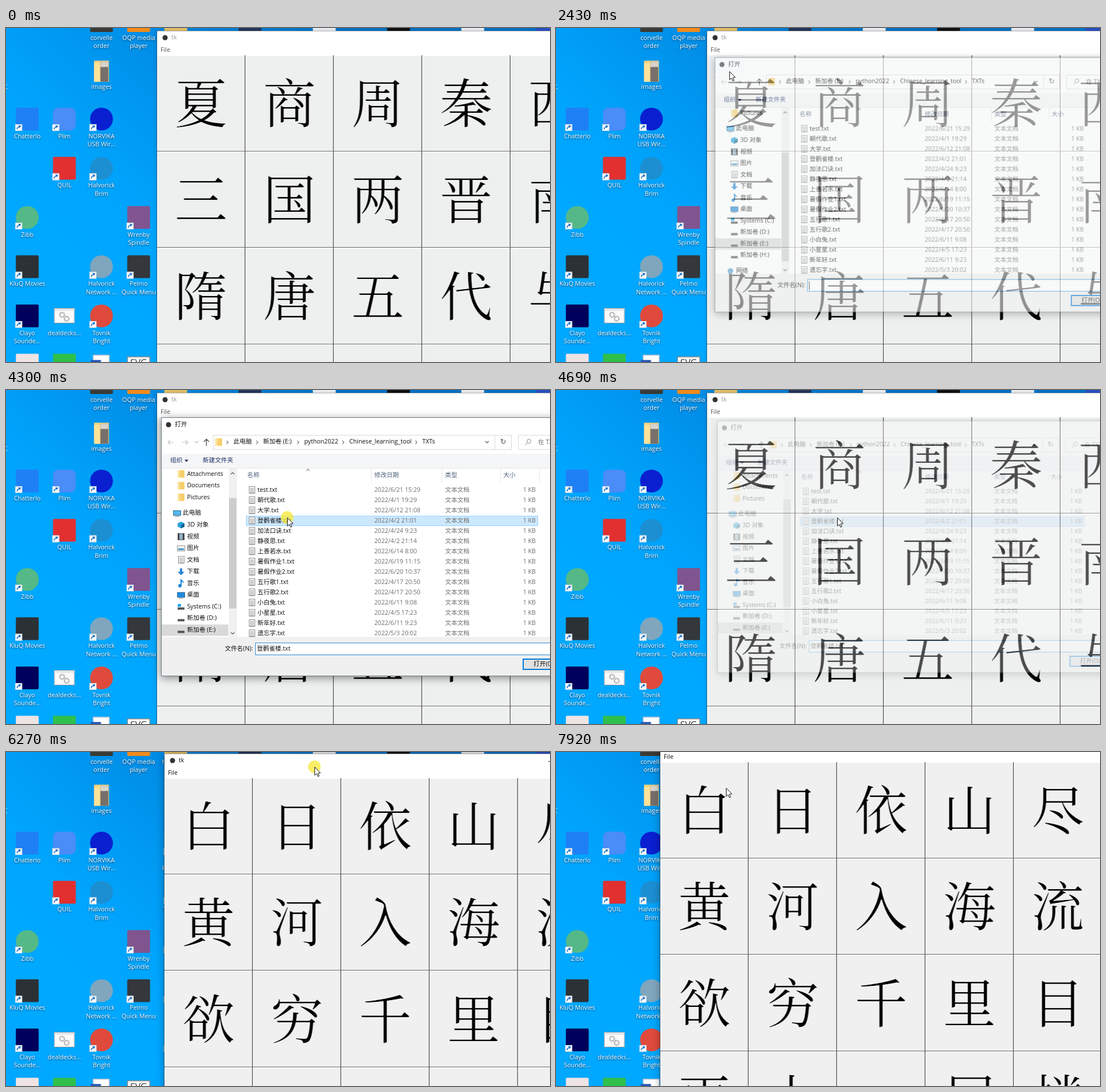
Recreate the animation shown at these times as an HTML page with a canvas. Size 954 px wide and 587 px high, loop 8000 ms.

```html
<!DOCTYPE html>
<html lang="zh">
<meta charset="utf-8">
<style>
html, body { margin: 0; width: 100%; height: 100%; overflow: hidden; background: #0092ec; }
canvas { display: block; }
</style>
<canvas id="stage" width="954" height="587"></canvas>
<script>
const LOOP = 8000;
const UI = '"Open Sans","Noto Sans CJK SC",sans-serif';
const ctx = document.getElementById('stage').getContext('2d');

function layer(w, h) {
  const c = document.createElement('canvas');
  c.width = w; c.height = h;
  return c.getContext('2d', { willReadFrequently: true });
}
function rect(g, x, y, w, h, fill, stroke, width = 1) {
  if (fill) { g.fillStyle = fill; g.fillRect(x, y, w, h); }
  if (stroke) {
    g.strokeStyle = stroke; g.lineWidth = width;
    g.strokeRect(x + .5, y + .5, w - 1, h - 1);
  }
}
function disc(g, x, y, r, fill) {
  g.fillStyle = fill;
  g.beginPath(); g.arc(x, y, r, 0, 7); g.fill();
}
function text(g, s, x, y, fill = '#111', align = 'left', size = 10.7) {
  g.font = size + 'px ' + UI;
  g.textAlign = align; g.textBaseline = 'middle'; g.fillStyle = fill;
  g.fillText(s, x, y);
}
function path(g, points, stroke, width = 1, close, fill) {
  g.beginPath();
  for (let i = 0; i < points.length; i += 2) g.lineTo(points[i], points[i + 1]);
  if (close) g.closePath();
  if (fill) { g.fillStyle = fill; g.fill(); }
  if (stroke) { g.strokeStyle = stroke; g.lineWidth = width; g.stroke(); }
}
function chevron(g, x, y, dir, color = '#555') {
  const d = { up: [-3, 2, 0, -1, 3, 2], down: [-3, -2, 0, 1, 3, -2], right: [-1, -3, 1.5, 0, -1, 3] }[dir];
  path(g, d.map((v, i) => v + (i % 2 ? y : x)), color, 1.1);
}

// Desktop: column, row, label, shape, colour
const ICONS = [
  [2, 0, 'corvelle|order', 'sq', '#3a3a35'], [3, 0, 'OQP media|player', 'sq', '#f08a1c'],
  [4, 0, 'Hux Clam', 'sq', '#e8c66a'], [6, 0, 'Dunmere|Creati...', 'sq', '#24365a'],
  [8, 0, '月亮没来过.|docx', 'sq', '#f2f4f8'], [10, 0, '云拼片', 'sq', '#111'],
  [12, 0, '千叶存盘', 'sq', '#f2f4f8'], [14, 0, 'Q 移机..', 'sq', '#2a52c8'],
  [2, 1, 'images', 'folder', ''], [0, 2, 'Chatterlo', 'sq', '#1f80f6'],
  [1, 2, 'Plim', 'sq', '#4a8cf8'], [2, 2, 'NORVIKA|USB Wir...', 'disc', '#0a1fd0'],
  [1, 3, 'QUIL', 'sq', '#e23030'], [2, 3, 'Halvorick|Brim', 'disc', '#1c8fd2'],
  [0, 4, 'Zibb', 'disc', '#55b987'], [3, 4, 'Wrenby|Spindle', 'sq', '#80558f'],
  [0, 5, 'KluQ Movies', 'sq', '#2c3136'], [2, 5, 'Halvorick|Network ...', 'disc', '#7fa6bd'],
  [3, 5, 'Pelmo|Quick Menu', 'sq', '#34373b'], [0, 6, 'Clayo|Sounde...', 'sq', '#00005c'],
  [1, 6, 'dealdecks...', 'gears', ''], [2, 6, 'Tovnik|Bright', 'disc', '#e04a3c'],
  [4, 2, 'Clayo|Paperon..', 'sq', '#e6dcdc'], [4, 3, 'TinHarps', 'sq', '#e3a32c'],
  [4, 4, 'Orbalo', 'disc', '#2b8f86'], [4, 5, 'Dunel|Utiliti', 'sq', '#1553b5'],
  [4, 6, '回收站', 'sq', '#cfd8de'], [0, 7, '', 'sq', '#eee4e4'], [1, 7, '', 'sq', '#2fc04c'],
  [2, 7, '', 'doc', ''], [3, 7, '', 'svg', ''], [4, 7, '', 'sq', '#a02030']
];

function drawIcon(g, [col, row, label, kind, color]) {
  const x = 37.3 + col * 65.1, y = -13 + row * 86.5;
  if (kind == 'sq') {
    g.fillStyle = color;
    g.beginPath(); g.roundRect(x - 20, y - 20, 40, 40, col == 1 && row == 2 ? 9 : 2); g.fill();
  } else if (kind == 'disc') disc(g, x, y, 20, color);
  else if (kind == 'folder') {
    rect(g, x - 13, y - 16, 26, 37, '#f7d57a');
    rect(g, x - 2, y - 14, 14, 35, '#77706a');
    rect(g, x - 2, y - 14, 14, 9, '#d8d4cc');
    rect(g, x - 13, y - 12, 10, 33, '#fbe29a');
  } else if (kind == 'gears') {
    rect(g, x - 18, y - 14, 36, 27, '#fafafa', '#8a9aa6');
    rect(g, x - 17, y - 13, 34, 4, '#dfe6ea');
    for (const [dx, dy, r] of [[-4, -2, 4], [4, 5, 4]]) {
      g.strokeStyle = '#a0a0a0'; g.lineWidth = 2.4; g.setLineDash([2, 1]);
      g.beginPath(); g.arc(x + dx, y + dy, r, 0, 7); g.stroke();
      g.setLineDash([]);
    }
  } else if (kind == 'doc') {
    rect(g, x - 15, y - 18, 29, 40, '#fff', '#9ab');
    rect(g, x - 19, y - 9, 18, 20, '#2457b8');
  } else {
    rect(g, x - 20, y - 15, 40, 40, '#fff', '#555');
    text(g, 'SVG', x, y - 3, '#333', 'center', 16);
  }
  if (row && kind != 'folder' && kind != 'gears') {
    rect(g, x - 21, y + 9, 12, 12, '#fff', '#c8d4dd');
    path(g, [x - 18, y + 18, x - 17, y + 15, x - 13, y + 13], '#1a6fc4', 1.6);
    path(g, [x - 16, y + 11, x - 11, y + 11.5, x - 13, y + 16], null, 1, true, '#1a6fc4');
  }
  g.shadowColor = '#002a50'; g.shadowBlur = 3; g.shadowOffsetY = 1;
  label.split('|').forEach((s, i) => text(g, s, x, 18 + row * 86.5 + i * 14.5, '#fff', 'center', 10.8));
  g.shadowColor = 'transparent'; g.shadowOffsetY = 0;
}

function makeDesktop() {
  const g = layer(954, 587);
  const sky = g.createLinearGradient(150, 450, 600, 0);
  ['#00a8ff', '#00a5fd', '#009af3', '#008de6', '#0080d9', '#0074cc']
    .forEach((color, i) => sky.addColorStop(i / 5, color));
  rect(g, 0, 0, 954, 587, sky);
  ICONS.forEach(i => drawIcon(g, i));
  text(g, '工', 3, 104, '#fff', 'right');
  text(g, '(', 1, 191, '#fff', 'right');
  return g.canvas;
}

// Large characters, thinned towards a light Song face
function rawGlyph(ch) {
  const g = layer(120, 120);
  g.font = '300 93px "Noto Serif CJK SC","Noto Sans CJK SC",serif';
  g.textAlign = 'center'; g.textBaseline = 'middle';
  g.fillText(ch, 60, 60);
  return g;
}
function strokeWidth(g, x, y, w, h) {
  return g.getImageData(x, y, w, h).data.reduce((sum, v, i) => i % 4 == 3 ? sum + v / 255 : sum, 0);
}
const probe = rawGlyph('十');
const thinX = Math.max(0, (strokeWidth(probe, 0, 88, 120, 1) - 5) * .5);
const thinY = Math.max(0, (strokeWidth(probe, 35, 0, 1, 120) - 2.6) * .45);

function glyph(ch) {
  const raw = rawGlyph(ch).canvas, g = layer(120, 120);
  g.drawImage(raw, -thinX / 2, -thinY / 2);
  g.globalCompositeOperation = 'destination-in';
  g.drawImage(raw, thinX / 2, thinY / 2);
  return g.canvas;
}

const CELL_W = 155, CELL_H = 169.4;
function makeGrid(rows, color) {
  const g = layer(800, 720);
  rect(g, 0, 0, 800, 720, color);
  rows.forEach((row, r) => [...row].forEach((ch, c) => {
    const x = c * CELL_W, y = Math.round(r * CELL_H);
    rect(g, x, y, CELL_W, 1, '#fff');
    rect(g, x, y, 1, 170, '#fff');
    rect(g, x + 153, y, 1, 170, '#a6a6a6');
    rect(g, x + 154, y, 1, 170, '#686868');
    rect(g, x, y + 168, CELL_W, 1, '#686868');
    g.drawImage(glyph(ch), x + 17, y + 24);
  }));
  return g.canvas;
}

const desktop = makeDesktop();
const dynasties = makeGrid(['夏商周秦西', '三国两晋南', '隋唐五代与', '     '], '#eef0f0');
const poem = makeGrid(['白日依山尽', '黄河入海流', '欲穷千里目', '更上一层楼'], '#f0f0f0');

function drawWindow(x, y, grid, active) {
  ctx.save();
  ctx.shadowColor = active ? 'rgba(0,0,0,.4)' : 'rgba(0,0,0,.22)';
  ctx.shadowBlur = active ? 13 : 7;
  rect(ctx, x, y, 800, 760, '#fff');
  ctx.restore();
  disc(ctx, x + 14, y + 12, 4.5, '#333');
  text(ctx, 'tk', x + 25, y + 12, active ? '#111' : '#999');
  if (grid == poem) path(ctx, [x + 673, y + 13.5, x + 682, y + 13.5], '#333');
  text(ctx, 'File', x + 6, y + 34, active ? '#111' : '#555');
  ctx.drawImage(grid, x, y + 43);
  rect(ctx, x - 1, y, 1, 760, 'rgba(60,60,60,.5)');
  rect(ctx, x, y, 800, 1, 'rgba(60,60,60,.35)');
}

const FILES = `test|6/21 15:29
朝代歌|4/1 19:29
大学|6/12 21:08
登鹳雀楼|4/2 21:01
加法口诀|4/24 9:23
静夜思|4/2 21:14
上善若水|6/14 8:00
暑假作业1|6/19 11:15
暑假作业2|6/20 10:37
五行歌1|4/17 20:50
五行歌2|4/17 20:50
小白兔|6/11 9:08
小星星|4/5 17:23
新年好|6/11 9:23
遗忘字|5/3 20:02`.split('\n').map(s => s.split('|'));
const TREE = ['Attachments', 'Documents', 'Pictures', '此电脑', '3D 对象', '视频', '图片', '文档', '下载',
  '音乐', '桌面', 'Systems (C:)', '新加卷 (D:)', '新加卷 (E:)', '新加卷 (H:)', '网络'];
const CRUMBS = [[399, '此电脑'], [451, '新加卷 (E:)'], [523, 'python2022'], [602, 'Chinese_learning_tool'], [730, 'TXTs']];

function sheet(g, x, y) {
  rect(g, x - 5, y - 7, 11, 13, '#fff', '#8b8b8b');
  for (let i = -4; i < 5; i += 2) rect(g, x - 3, y + i, 7, 1, '#a5a5a5');
}

function treeIcon(g, i, x, y) {
  if (i < 3) {
    rect(g, x - 6, y - 7, 12, 13, '#f6cf6b');
    rect(g, x - 6, y - 7, 4, 13, '#fbe09a');
  } else if (i == 3 || i == 10) {
    rect(g, x - 7, y - 5, 14, 9, i == 3 ? '#55b9ee' : '#1d8be0', '#3a6f9a');
    rect(g, x - 4, y + 5, 8, 1, '#777');
  } else if (i == 4) {
    path(g, [x, y - 6, x + 6, y - 3, x + 6, y + 3, x, y + 6, x - 6, y + 3, x - 6, y - 3], null, 1, true, '#27a3d8');
    path(g, [x, y, x + 6, y - 3, x + 6, y + 3, x, y + 6], null, 1, true, '#13658f');
  } else if (i == 5) {
    rect(g, x - 6, y - 6, 12, 12, '#444');
    rect(g, x - 3, y - 5, 6, 10, '#8fb0c6');
  } else if (i == 6) {
    rect(g, x - 7, y - 5, 14, 10, '#fff', '#888');
    rect(g, x - 5, y, 10, 3, '#3c8fc8');
  } else if (i == 7) sheet(g, x, y);
  else if (i == 8) {
    path(g, [x - 2, y - 6, x + 2, y - 6, x + 2, y, x + 6, y, x, y + 6, x - 6, y, x - 2, y], null, 1, true, '#2484d6');
  } else if (i == 9) {
    disc(g, x - 2, y + 4, 3, '#1f86d8');
    path(g, [x, y + 4, x, y - 6, x + 4, y - 2], '#1f86d8', 2);
  } else if (i == 15) disc(g, x, y, 5, '#5a9fd0');
  else {
    rect(g, x - 6, y + 1, 12, 4, '#555');
    if (i == 11) rect(g, x - 6, y - 5, 6, 5, '#28a8ea');
  }
}

function drawTree(g, scroll) {
  g.save();
  g.beginPath(); g.rect(273, 138, 132, 296); g.clip();
  rect(g, 273, 138, 132, 296, '#fff');
  TREE.forEach((name, i) => {
    const y = 148 + i * 20.55 + (i > 2 ? 7 : 0) + (i > 14 ? 7 : 0) - scroll;
    const root = i == 3 || i == 15;
    if (i == 13) rect(g, 273, y - 10, 117, 20, '#d9d9d9');
    treeIcon(g, i, root ? 300 : 307, y);
    text(g, name, root ? 310 : 317.5, y);
  });
  rect(g, 391, 138, 14, 296, '#f0f0f0');
  rect(g, 391, 190 + scroll * .68, 13, 194, '#cdcdcd');
  chevron(g, 397.5, 146, 'up');
  chevron(g, 397.5, 428, 'down');
  g.restore();
}

function drawFiles(g, hover, picked) {
  rect(g, 405, 138, 702, 296, '#fff');
  [[423, '名称'], [646, '修改日期'], [770, '类型'], [872, '大小']].forEach(([x, s]) => text(g, s, x, 150, '#4c607a'));
  for (const x of [640, 764, 867, 935]) rect(g, x, 138, 1, 25, '#e5e5e5');
  chevron(g, 529.5, 140, 'up', '#888');
  FILES.forEach(([name, date], i) => {
    const y = 176 + i * 18;
    if (i == picked) rect(g, 421, y - 9, 512, 18, '#cce8ff', '#99d1ff');
    else if (i == hover) rect(g, 421, y - 9, 512, 18, '#e5f3ff');
    sheet(g, 431, y);
    text(g, name + '.txt', 441, y);
    text(g, '2022/' + date, 646, y, '#6d6d6d');
    text(g, '文本文档', 770, y, '#6d6d6d');
    text(g, '1 KB', 929, y, '#6d6d6d', 'right');
  });
}

function drawDialog(g, t, mouse) {
  g.save();
  g.shadowColor = 'rgba(0,0,0,.45)'; g.shadowBlur = 14; g.shadowOffsetY = 3;
  rect(g, 272, 48, 836, 455, '#f0f0f0');
  g.restore();
  rect(g, 272, 48, 836, 64, '#fff');
  disc(g, 285, 61, 4.5, '#333');
  text(g, '打开', 296, 61);
  for (const [x, d] of [[289, -1], [314, 1]]) {
    path(g, [x - 5, 92, x + 5, 92], '#c4c4c4', 1.2);
    path(g, [x + d, 88, x + d * 5, 92, x + d, 96], '#c4c4c4', 1.2);
  }
  chevron(g, 334, 92, 'down', '#bbb');
  path(g, [351.5, 98, 351.5, 87], '#444', 1.3);
  path(g, [347, 91, 351.5, 86.5, 356, 91], '#444', 1.3);
  rect(g, 363, 79, 524, 26, '#fff', '#d9d9d9');
  rect(g, 857, 79, 1, 26, '#d9d9d9');
  treeIcon(g, 0, 373, 92);
  CRUMBS.forEach(([x, s]) => {
    chevron(g, x - 11, 92, 'right');
    text(g, s, x, 91.5);
  });
  chevron(g, 843.5, 92, 'down');
  text(g, '↻', 872, 92, '#555', 'center', 13);
  rect(g, 898, 79, 200, 26, '#fff', '#d9d9d9');
  g.strokeStyle = '#888'; g.lineWidth = 1;
  g.beginPath(); g.arc(917, 90, 3.5, 0, 7); g.stroke();
  path(g, [914.5, 92.5, 910.5, 97], '#888');
  text(g, '在 TXTs 中搜索', 933, 92, '#6d6d6d');
  rect(g, 272, 112, 836, 26, '#f5f6f7');
  rect(g, 272, 137, 836, 1, '#e3e5e8');
  text(g, '组织', 288, 124.5, '#1e2f66');
  path(g, [313, 122.5, 320, 122.5, 316.5, 126.5], null, 1, true, '#1e2f66');
  text(g, '新建文件夹', 345, 124.5, '#1e2f66');

  const chosen = t >= 4220;
  const hover = mouse.x > 421 && mouse.x < 933 && t > 2600 ? Math.floor((mouse.y - 167) / 18) : -1;
  drawFiles(g, hover, chosen ? 3 : -1);
  drawTree(g, t < 2560 ? 41 : 0);

  text(g, '文件名(N):', 433, 455, '#111', 'right');
  rect(g, 437, 444, 680, 22, '#fff', '#2a8ad8');
  if (chosen) text(g, '登鹳雀楼.txt', 440, 455.5);
  else if (Math.floor((t - 2400) / 530) % 2 == 0) rect(g, 440, 448, 1, 15, '#000');
  rect(g, 906.5, 472.5, 90, 19, '#e1e1e1', '#0078d7', 2);
  text(g, '打开(O)', 925, 482);
  rect(g, 272, 48, 836, 455, null, '#6f7d86');
}

// Pointer: time, x, y
const MOVES = [[70, 388, 234], [400, 300, 110], [600, 254, 40], [750, 262, 22], [870, 289, 42], [1020, 284, 43],
  [1600, 284, 43], [1950, 312, 67], [2120, 304, 76], [2500, 304, 76], [2670, 405, 140], [2830, 450, 165],
  [3540, 480, 194], [3670, 485, 210], [3840, 493, 224], [4760, 493, 224], [4930, 509, 206], [5200, 509, 206],
  [5480, 534, 118], [5950, 552, 70], [6040, 552, 70], [6270, 541, 26], [6740, 477, -1], [6810, 466, -1],
  [6970, 446, -2], [7600, 446, -2], [7920, 298, 63]];

function pointer(t) {
  const i = MOVES.findIndex(m => m[0] > t);
  if (i < 1) {
    const [, x, y] = MOVES[i ? MOVES.length - 1 : 0];
    return { x, y };
  }
  const [t0, x0, y0] = MOVES[i - 1], [t1, x1, y1] = MOVES[i], k = (t - t0) / (t1 - t0);
  return { x: x0 + (x1 - x0) * k, y: y0 + (y1 - y0) * k };
}

const PRESSES = [[1250, 1400], [2050, 2200], [4220, 4380], [4440, 4560], [6000, 7100]];
function drawPointer(t, { x, y }) {
  if (PRESSES.some(([a, b]) => t >= a && t < b)) disc(ctx, x, y, 11, 'rgba(246,232,50,.75)');
  const shape = [0, 0, 0, 14.5, 3.3, 11.5, 5.6, 16.6, 7.8, 15.6, 5.6, 10.7, 10, 10.3];
  path(ctx, shape.map((v, i) => v + (i % 2 ? y : x) + .5), '#111', 1, true, '#fff');
}

function drawMenu(t) {
  if (t < 1330 || t > 2500) return;
  ctx.globalAlpha = Math.min(1, (2500 - t) / 250);
  rect(ctx, 266, 48, 63, 38, '#f2f2f2', '#ccc');
  rect(ctx, 269, 53, 59, 28, t > 1650 ? '#cfe6f8' : '#f2f2f2');
  if (t < 2330) text(ctx, 'Open', 289, 67);
  ctx.globalAlpha = 1;
}

const dialog = layer(1130, 530);
function draw(t) {
  const mouse = pointer(t);
  ctx.drawImage(desktop, 0, 0);
  if (t < 4930) {
    drawWindow(265, 5, dynasties, t >= 1250 && t < 2330 || t > 4720);
    drawMenu(t);
  } else {
    const grip = pointer(Math.min(Math.max(t, 6040), 6970));
    drawWindow(Math.round(grip.x - 263), Math.round(grip.y - 23), poem, true);
  }
  const shown = Math.min(1, (t - 2330) / 170, (4740 - t) / 160);
  if (shown > 0) {
    const s = 1 - .037 * (1 - shown);
    dialog.clearRect(0, 0, 1130, 530);
    drawDialog(dialog, t, mouse);
    ctx.save();
    ctx.globalAlpha = shown;
    ctx.translate(690, 276); ctx.scale(s, s); ctx.translate(-690, -276);
    ctx.drawImage(dialog.canvas, 0, 0);
    ctx.restore();
  }
  if (t >= 70) drawPointer(t, mouse);
}

const start = performance.now();
function tick() {
  draw((performance.now() - start) % LOOP);
  requestAnimationFrame(tick);
}
tick();
</script>
</html>
```
